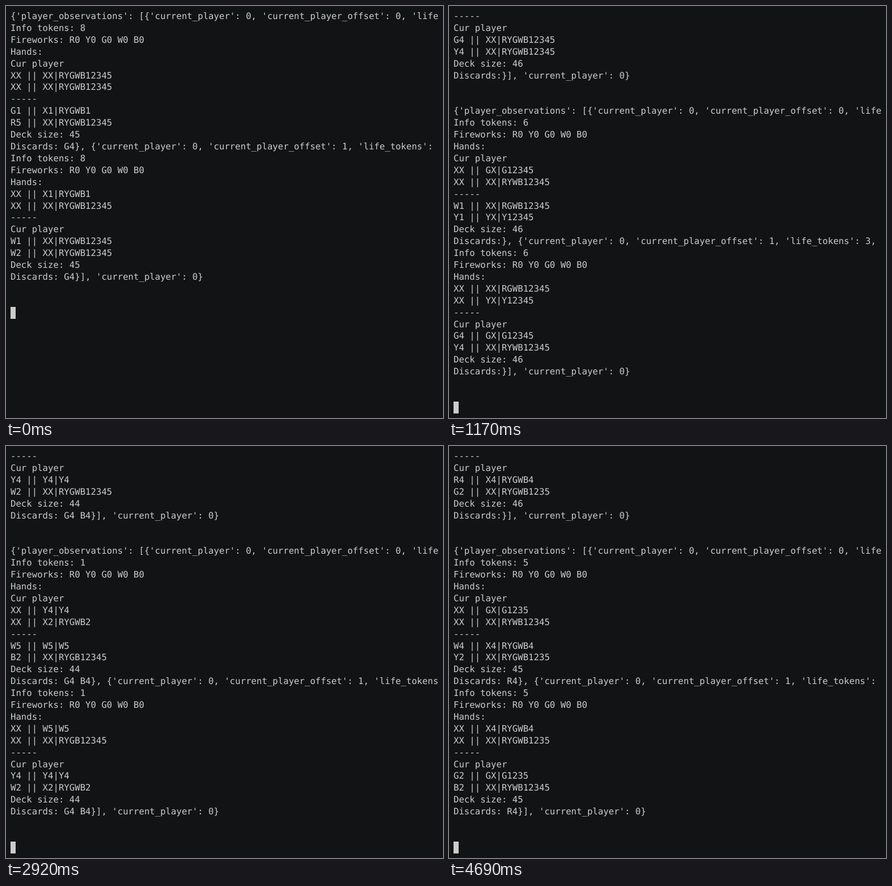
Animation of 771 by 727 pixels, one loop 5.69 s. Source, as an HTML page:

```html
<!DOCTYPE html>
<html lang="en">
<head>
<meta charset="utf-8">
<title>Card game log</title>
<style>
  html, body { margin: 0; width: 100%; height: 100%; overflow: hidden; background: #121314; }
  pre {
    margin: 0; padding: 8px; color: #ccc;
    font: 15.68px/20.912px "DejaVu Sans Mono", monospace;
    font-variant-ligatures: none;
    text-rendering: geometricPrecision;
  }
  #cursor { display: inline-block; vertical-align: top; width: 9.44px; height: 20.912px; background: #ccc; }
</style>
</head>
<body>
<pre><span id="log"></span><span id="cursor"></span></pre>
<script>
const LOOP = 5690, COLS = 80;
const times = [0, 200, 400, 590, 790, 980, 1170, 1360, 1560, 1750, 1940, 2140, 2330,
  2530, 2720, 2920, 3120, 3310, 3510, 3700, 3900, 4100, 4300, 4490, 4690];

// info tokens, fireworks, deck size, own hand, partner's hand, discards
// A card without a hint note is fully unknown to its holder.
const turns = [
  [8, '00000', 45, 'W1, W2', 'G1 X1|RYGWB1, R5', 'G4'],
  [7, '00010', 44, 'W2 XX|YGWB12345, R4 RX|R12345', 'G1 X1|RYGWB1, R5', 'G4'],
  [8, '00010', 42, 'W2 XX|YGWB12345, G1', 'R5, G5', 'G4 R4 G1'],
  [8, '00010', 41, 'W2 XX|YGWB12345, G1', 'R5 X5|RYGWB5, B3', 'G4 R4 G1 G5'],
  [8, '00020', 39, 'G1, Y2', 'R5 X5|RYGWB5, W3', 'G4 R4 G1 G5 B3'],

  [8, '00000', 46, 'G4, Y4', 'W1, Y1', ''],
  [6, '00000', 46, 'G4 GX|G12345, Y4 XX|RYWB12345', 'W1 XX|RGWB12345, Y1 YX|Y12345', ''],
  [6, '01000', 44, 'G4 GX|G12345, B3', 'W1 XX|RGWB12345, R3', 'Y4'],
  [8, '01000', 42, 'G4 GX|G12345, W4', 'R3, B1', 'Y4 B3 W1'],
  [8, '01001', 40, 'G4 GX|G12345, R1', 'R3, Y3', 'Y4 B3 W1 W4'],

  [8, '00000', 46, 'G4, Y4', 'B4, W5', ''],
  [6, '00000', 46, 'G4 X4|RYGWB4, Y4 X4|RYGWB4', 'B4 XX|RYGB12345, W5 WX|W12345', ''],
  [4, '00000', 46, 'G4 G4|G4, Y4 X4|RYWB4', 'B4 XX|RYGB12345, W5 WX|W12345', ''],
  [2, '00000', 46, 'G4 G4|G4, Y4 Y4|Y4', 'B4 XX|RYGB1234, W5 W5|W5', ''],
  [3, '00000', 44, 'Y4 Y4|Y4, W2', 'W5 W5|W5, B2', 'G4 B4'],
  [1, '00000', 44, 'Y4 Y4|Y4, W2 X2|RYGWB2', 'W5 W5|W5, B2 XX|RYGB12345', 'G4 B4'],
  [3, '00000', 42, 'W2 X2|RYGWB2, W3', 'W5 W5|W5, R1', 'G4 B4 Y4 B2'],
  [1, '00000', 42, 'W2 X2|RYGWB2, W3 XX|RYGWB1345', 'W5 W5|W5, R1 RX|R12345', 'G4 B4 Y4 B2'],
  [2, '00000', 40, 'W3 XX|RYGWB1345, W1', 'R1 RX|R12345, B5', 'G4 B4 Y4 B2 W2 W5'],
  [1, '00000', 39, 'W3 XX|RYGWB1345, W1', 'R1 R1|R1, Y1', 'G4 B4 Y4 B2 W2 W5 B5'],

  [8, '00000', 46, 'Y2, B4', 'R3, G3', ''],
  [8, '00000', 44, 'Y2, G1', 'G3, W2', 'B4 R3'],

  [8, '00000', 46, 'R4, G2', 'W4, Y2', ''],
  [6, '00000', 46, 'R4 X4|RYGWB4, G2 XX|RYGWB1235', 'W4 X4|RYGWB4, Y2 XX|RYGWB1235', ''],
  [5, '00000', 45, 'G2 GX|G1235, B2 XX|RYWB12345', 'W4 X4|RYGWB4, Y2 XX|RYGWB1235', 'R4']
];

function hand(cards, hidden) {
  return cards.split(', ').map(c => {
    const [card, note = 'XX|RYGWB12345'] = c.split(' ');
    return `${hidden ? 'XX' : card} || ${note}`;
  });
}

const player = n => `{'current_player': 0, 'current_player_offset': ${n}, 'life_tokens': 3, `;

function report([info, fires, deck, own, other, gone]) {
  const discards = 'Discards:' + (gone && ' ' + gone);
  const head = [
    'Info tokens: ' + info,
    'Fireworks: ' + [...'RYGWB'].map((c, i) => c + fires[i]).join(' '),
    'Hands:'
  ];
  const size = 'Deck size: ' + deck;
  return [
    "{'player_observations': [" + player(0), ...head,
    'Cur player', ...hand(own, true), '-----', ...hand(other), size,
    discards + '}, ' + player(1), ...head,
    ...hand(other, true), '-----', 'Cur player', ...hand(own), size,
    discards + "}], 'current_player': 0}", '', ''
  ].map(line => line.slice(0, COLS));
}

const reports = turns.map(report);
// Each screen keeps the tail of the report before it.
const screens = reports.map((r, i) =>
  [...(i ? reports[i - 1].slice(-8) : []), ...r, ''].join('\n'));

const log = document.getElementById('log');
let shown = -1;
function draw() {
  const t = performance.now() % LOOP;
  const i = times.filter(x => x <= t).length - 1;
  if (i !== shown) log.textContent = screens[shown = i];
  requestAnimationFrame(draw);
}
draw();
</script>
</body>
</html>
```
